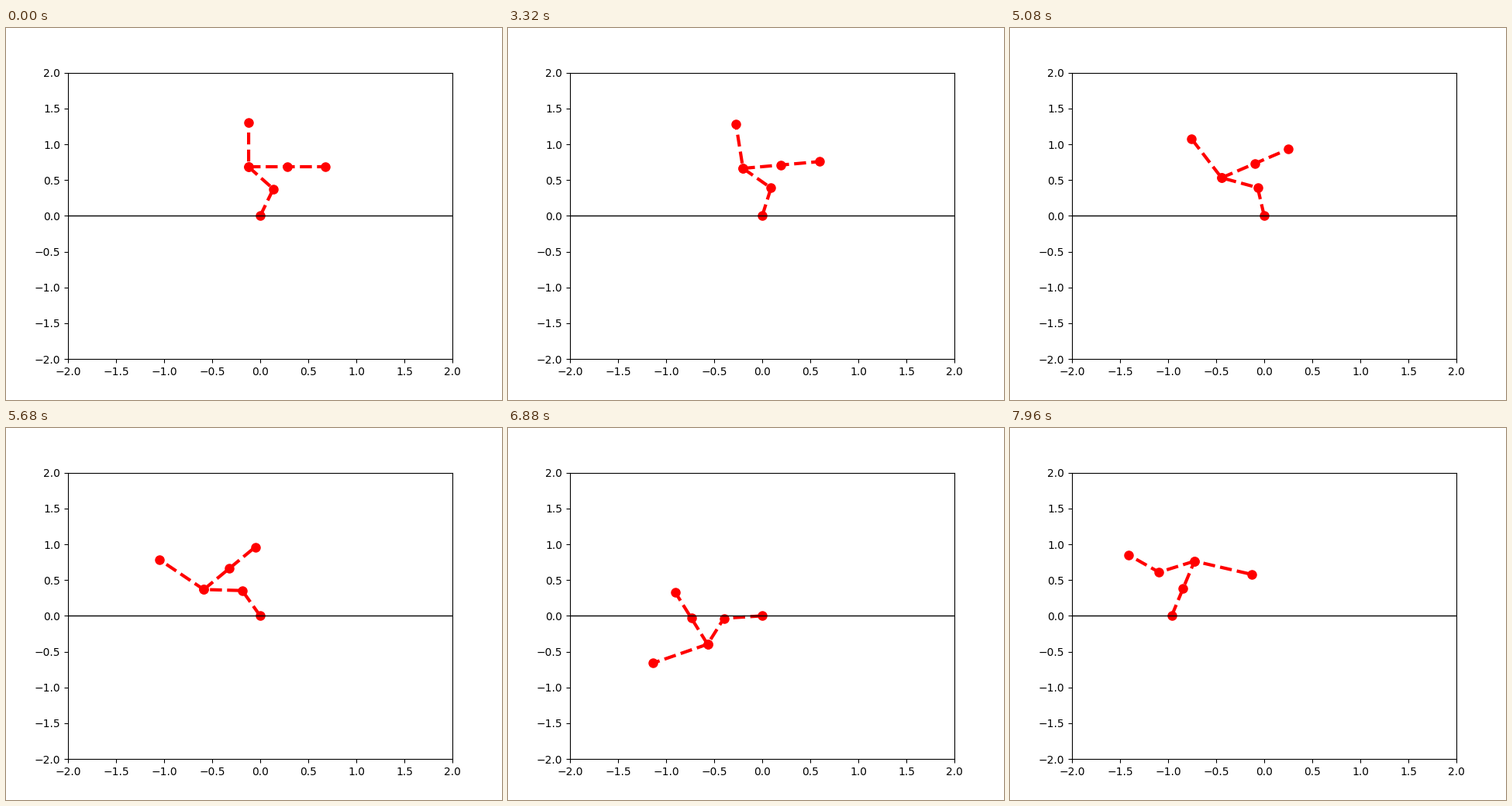
A matplotlib script for the animation above (8000 ms loop, 640 by 480 pixels).

```python
import numpy as np
import matplotlib.pyplot as plt
from matplotlib.animation import FuncAnimation

FRAMES, INTERVAL = 200, 40
SUBSTEPS = 40
LEG, TORSO = 0.4, 0.625

# Body pose at rest: link directions in degrees
SHIN, THIGH, BACK, SWING = 70, 130, 90, 0

# Fall about the first foot, then about the second one (units: radians, frames)
LEAN, FALL_RATE = 0.02073, 0.0312
REST_ANGLE, RISE_RATE, KICK = np.radians(185), 0.03114, 0.1094


def link(length, degrees, turn):
    a = np.radians(degrees) + turn
    return length * np.array([np.cos(a), np.sin(a)])


def body(turn):
    """Joint positions with the first foot at the origin."""
    foot = np.zeros(2)
    knee = foot + link(LEG, SHIN, turn)
    hip = knee + link(LEG, THIGH, turn)
    head = hip + link(TORSO, BACK, turn)
    knee2 = hip + link(LEG, SWING, turn)
    foot2 = knee2 + link(LEG, SWING, turn)
    return np.array([foot, knee, hip, head, knee2, foot2])


def simulate():
    """Turn of the rigid body and supporting foot for each frame."""
    turn, speed, landed = 0.0, 0.0, False
    states = []
    h = 1 / SUBSTEPS

    def pull(t):
        if landed:
            return -RISE_RATE ** 2 * np.cos(t + REST_ANGLE)
        return FALL_RATE ** 2 * np.sin(t + LEAN)

    for _ in range(FRAMES):
        states.append((turn, landed))
        if not landed and body(turn)[5, 1] < 0:
            landed, speed = True, KICK
        for _ in range(SUBSTEPS):
            speed += pull(turn) * h / 2
            turn += speed * h
            speed += pull(turn) * h / 2
    return states


states = simulate()
stride = np.linalg.norm(body(0)[5])


def joints(i):
    turn, landed = states[i]
    pts = body(turn)
    if not landed:
        return pts
    pts = pts + np.array([-stride, 0]) - pts[5]
    # the legs swap roles
    return pts[[5, 4, 2, 3, 1, 0]]


fig, ax = plt.subplots(figsize=(6.4, 4.8), dpi=100)
ax.set_xlim(-2, 2)
ax.set_ylim(-2, 2)
style = dict(color="red", linestyle="--", marker="o", linewidth=3, markersize=8)
stance, = ax.plot([], [], **style)
swing, = ax.plot([], [], **style)
ax.plot([-2, 2], [0, 0], color="black", linewidth=1)


def update(i):
    p = joints(i)
    stance.set_data(*p[:4].T)
    swing.set_data(*p[[2, 4, 5]].T)
    return stance, swing


anim = FuncAnimation(fig, update, frames=FRAMES, interval=INTERVAL, repeat=True)
plt.show()
```
